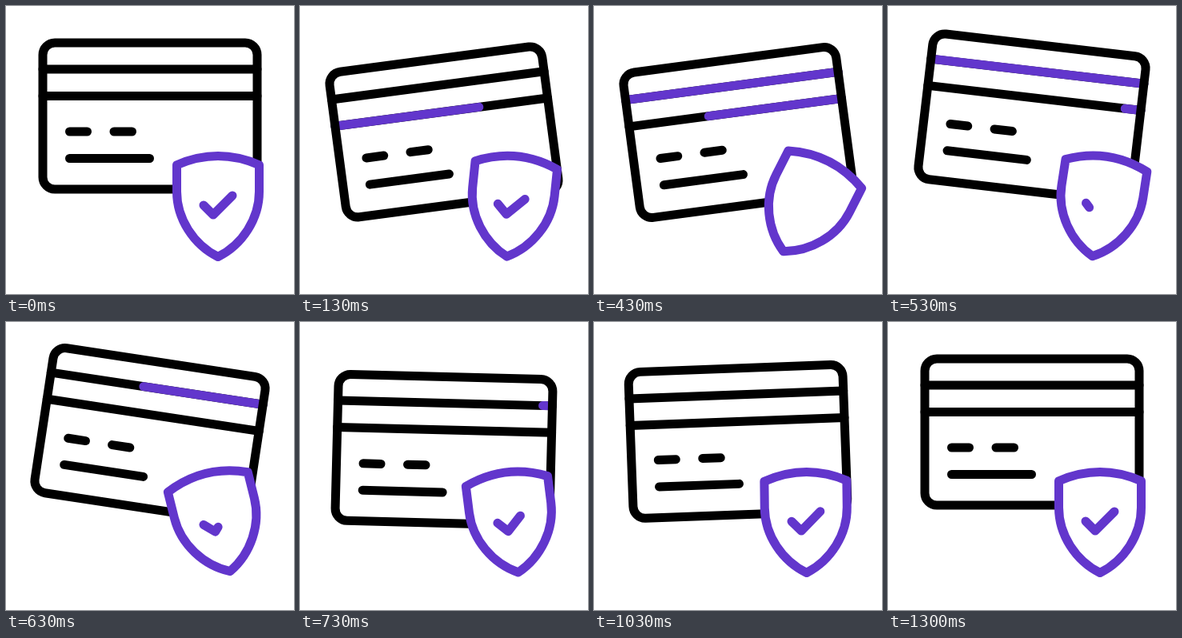
An HTML page that plays this animation: 360x360 px, repeating every 1670 ms.

```html
<!DOCTYPE html>
<html lang="en">
<head>
<meta charset="utf-8">
<title>Secure card</title>
<style>
  html, body { margin: 0; width: 100%; height: 100%; overflow: hidden; background: #fff; }
  svg { display: block; width: 100vw; height: 100vh; }
  path, rect { fill: none; stroke: #000; stroke-width: 11; stroke-linecap: round; stroke-linejoin: round; }
  .accent { stroke: #6236cc; }
  .shield { fill: #fff; }
</style>
</head>
<body>
<svg viewBox="0 0 360 360">
  <!-- card drawn around its centre -->
  <g id="card">
    <path d="M-134 -58.5H134M-134 -25H134"/>
    <path id="upper" class="accent"/>
    <path id="lower" class="accent"/>
    <rect x="-134" y="-91.5" width="268" height="183" rx="15"/>
    <path d="M-100.5 19.5H-78.5M-45 19.5H-22.5M-100.5 53H-0.5"/>
  </g>
  <!-- shield drawn around its pivot -->
  <g id="shield">
    <path class="accent shield" d="M-51.5 -52.3Q0 -74.6 51.5 -52.3V-19C51.5 15 30.4 47.4 0 62.5C-30.4 47.4 -51.5 15 -51.5 -19Z"/>
    <path id="check" class="accent" d="M-18 -2L-6 10L18 -14" pathLength="100"/>
  </g>
</svg>
<script>
  const LOOP = 1670, STEP = 100 / 3, LAST = 39;
  const el = id => document.getElementById(id);
  const card = el('card'), shield = el('shield'), check = el('check');

  // keys are [frame, value] pairs, eased in and out between neighbours
  const TILT = [[0, 0], [9.3, -19.3], [17.7, 9.5], [26, -5.7], [34.6, 0]];
  const DROP = [[0, 0], [8.4, 43], [17.33, 0], [26, 40], [33.9, 0]];
  const SWING = [[0, 0], [13, 27], [19.5, -14.6], [26, 8.3], [32.5, -2], [39, 0]];
  const CHECK = [[2, 100], [13, 0], [25.5, 100]];

  const ease = x => (1 - Math.cos(Math.PI * Math.min(1, Math.max(0, x)))) / 2;
  const ramp = (f, from, span) => ease((f - from) / span);

  function track(keys, f) {
    let v = keys[0][1];
    for (let i = 1; i < keys.length; i++) {
      const [a, va] = keys[i - 1], [b, vb] = keys[i];
      if (f >= a) v = va + (vb - va) * ramp(f, a, b - a);
    }
    return v;
  }

  // coloured sweep along a stripe: fills from the left, then leaves to the right
  function sweep(id, y, f) {
    const head = ramp(f, 0, 6.5), tail = ramp(f, 9.9, 7.4);
    const on = head > 0 && tail < 1;
    el(id).setAttribute('d', on ? `M${268 * tail - 134} ${y}H${268 * head - 134}` : '');
  }

  function draw(ms) {
    const f = Math.min(LAST, Math.floor((ms % LOOP + 4) / STEP));
    card.setAttribute('transform', `translate(180 ${137.5 + track(DROP, f)}) rotate(${track(TILT, f)})`);
    shield.setAttribute('transform', `translate(265 251) rotate(${track(SWING, f)})`);
    sweep('lower', -25, f);
    sweep('upper', -58.5, f - 5.7);
    const drawn = track(CHECK, f);
    check.setAttribute('stroke-dasharray', drawn > 99.9 ? 'none' : `${drawn} 200`);
    check.setAttribute('visibility', drawn > 0.5 ? 'visible' : 'hidden');
  }

  const start = performance.now();
  function tick() {
    draw(performance.now() - start);
    requestAnimationFrame(tick);
  }
  draw(0);
  requestAnimationFrame(tick);
</script>
</body>
</html>
```
